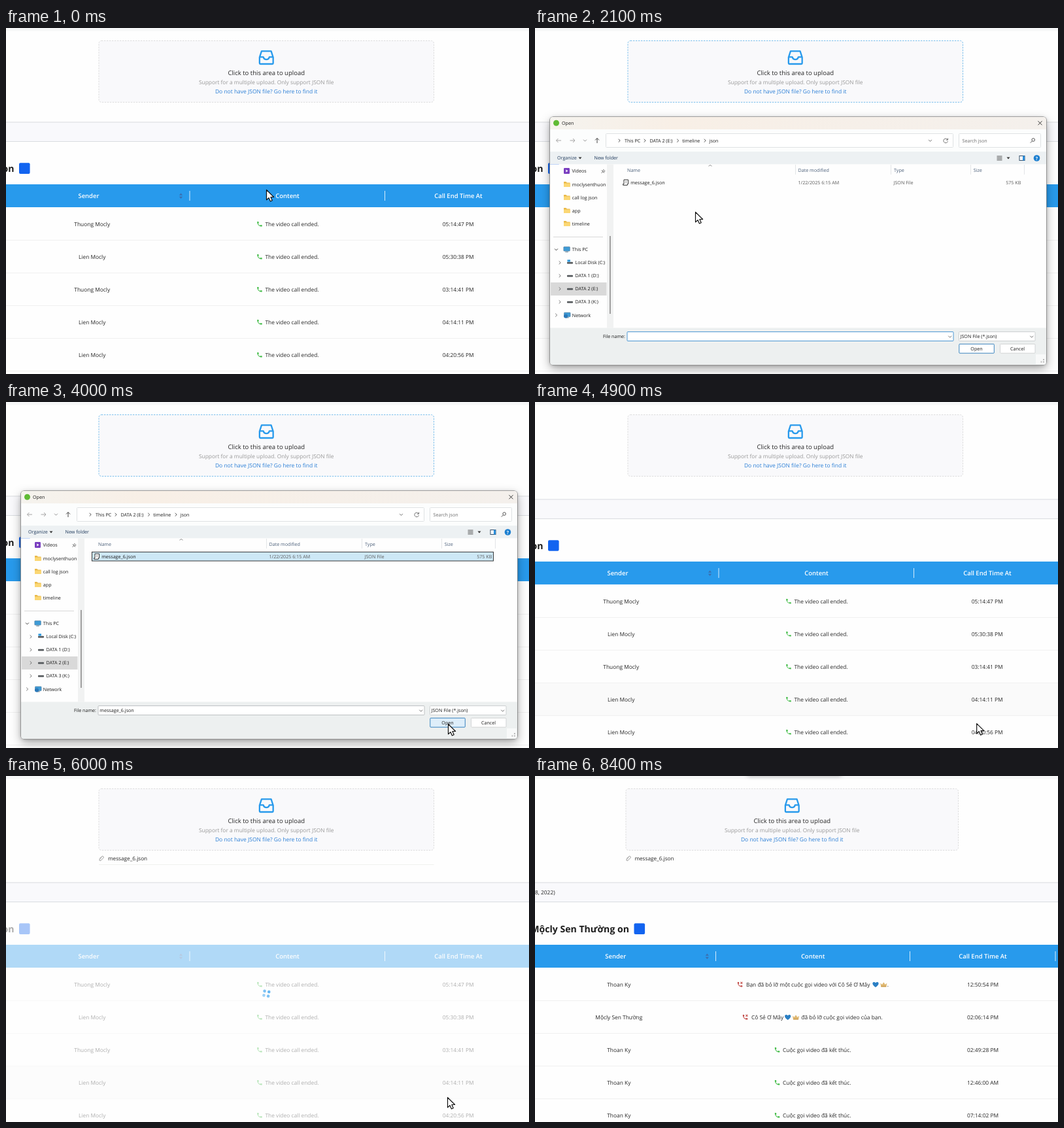
Recreate the animation shown at these times as an HTML page. Size 800x529 px, loop 8500 ms.

```html
<!DOCTYPE html>
<html lang="en">
<head>
<meta charset="utf-8">
<title>Call log upload</title>
<style>
  html, body { margin: 0; width: 100%; height: 100%; overflow: hidden; background: #fefefe; }
  svg { position: absolute; left: 0; top: 0; width: 800px; height: 529px; }
  text { font-family: "Open Sans", "Noto Sans", sans-serif; text-rendering: geometricPrecision; white-space: pre; }
  #shell {
    position: absolute; left: 23px; top: 136px; width: 759px; height: 379px; border-radius: 5px;
    box-shadow: 0 0 0 .8px #8a8a8a, 0 6px 16px rgba(0, 0, 0, .34), 0 1px 5px rgba(0, 0, 0, .2);
  }
  #toast { filter: blur(3px); }
</style>
</head>
<body>
<svg id="page" viewBox="0 0 800 529"></svg>
<div id="shell"></div>
<svg id="front" viewBox="0 0 800 529"></svg>
<script>
const LOOP = 8500, STEP = 100, SHIFT = 19;
const BLUE = '#289aec', INK = '#262626';
const $ = id => document.getElementById(id);

const text = (x, y, str, { size = 8.4, fill = INK, anchor = 'start', weight = 400 } = {}) =>
  `<text x="${x}" y="${y}" font-size="${size}" fill="${fill}" text-anchor="${anchor}" font-weight="${weight}">${str}</text>`;
const rect = (x, y, w, h, fill, extra = '') =>
  `<rect x="${x}" y="${y}" width="${w}" height="${h}" fill="${fill}" ${extra}/>`;
const path = (d, fill, extra = '') => `<path d="${d}" fill="${fill}" ${extra}/>`;
const line = (d, color, width = 1, extra = '') =>
  path(d, 'none', `stroke="${color}" stroke-width="${width}" ${extra}`);
const group = (x, y, body, scale = 1) => `<g transform="translate(${x} ${y}) scale(${scale})">${body}</g>`;

// ---- page ----
const HANDSET = 'M6.6 10.8c1.4 2.8 3.8 5.1 6.6 6.6l2.2-2.2c.3-.3.7-.4 1-.2 1.1.4 2.3.6 3.6.6.5 0 1 .4 1 1V20c0 .6-.5 1-1 1C10.600 21 3 13.400 3 4c0-.6.5-1 1-1h3.500c.6 0 1 .4 1 1 0 1.200.2 2.400.6 3.600.1.300 0 .7-.3 1z';
const phone = (x, y, missed) => group(x - 5, y - 5,
  path(HANDSET, missed ? '#c4504c' : '#45bd4a') +
  (missed ? line('M14 3l7 7M21 3l-7 7', '#c4504c', 2.4) : ''), .42);
const heart = (x, y) => group(x, y,
  path('M0 4.300C-8-.5-4-6 0-2.500 4-6 8-.5 0 4.300z', '#2a7fc4'));
const crown = (x, y) => group(x, y,
  path('M-4 3.500L-5-2-2.300 0 0-3.500 2.300 0 5-2 4 3.500z', '#dfb872') + rect(-4, 2.300, 8, 1.400, '#c99a4c'));

const inbox = cx => group(cx, 45, line(
  'M-7.300-9.700H7.300L10.400-.2V8.800Q10.400 10 9.200 10H-9.200Q-10.400 10-10.400 8.800V-.2ZM-10.400-.6H-4.600Q-3.600 3.200 0 3.200T4.600-.6H10.400',
  BLUE, 2.3, 'stroke-linejoin="round"'));

function uploadArea(left, width, id) {
  const cx = left + width / 2, mid = { anchor: 'middle' };
  return `<rect id="${id}" x="${left}" y="19.5" width="${width}" height="94" rx="4" fill="#f9f9fb" stroke="#dadada" stroke-width=".9" stroke-dasharray="2.4 1.6"/>` +
    inbox(cx) +
    text(cx, 72, 'Click to this area to upload', { ...mid, size: 9.53 }) +
    text(cx, 85.7, 'Support for a multiple upload. Only support JSON file', { ...mid, fill: '#999' }) +
    text(cx, 99.7, 'Do not have JSON file? Go here to find it', { ...mid, size: 8.47, fill: '#2b7fd6' });
}

const paperclip = x => line(`M${x} 126.500l3.300-3.300q1.500-1.300 2.600 0 1 1.200-.3 2.500l-3.400 3.300q-1.200 1-2 .1-.8-1 .2-1.900l3-2.900`, '#8c8c8c', .9);

const band = label => rect(-2, 144, 804, 29.5, '#f9f9fc', 'stroke="#d9dce0"') + text(0, 161.700, label);

function table({ cols, seps, sort, cell, rows, title, titleEnd }) {
  const head = { size: 9.45, fill: '#fff', weight: 600, anchor: 'middle' };
  const mid = { anchor: 'middle' };
  let out = text(titleEnd, 220, title, { size: 14.1, weight: 700, anchor: 'end', fill: '#1c1c1c' }) +
    rect(titleEnd + 7.5, 206.3, 16.6, 16.6, '#1264f0', 'rx="2"') +
    rect(0, 239, 800, 35, BLUE);
  ['Sender', 'Content', 'Call End Time At'].forEach((name, i) => out += text(cols[i], 260.2, name, head));
  out += path(`M${sort - 2.600} 255.800h5.200l-2.600-3.200zM${sort - 2.600} 257.800h5.200l-2.600 3.200z`, '#3a6fb0');
  seps.forEach(x => out += rect(x, 249, 1, 15, '#d6ecfc'));
  rows.forEach(([sender, content, time], i) => {
    const y = 299.7 + 50 * i;
    out += rect(0, 324 + 50 * i, 800, 1, '#f0f0f0') +
      text(cell[0], y + 3, sender, mid) + content(y) + text(cell[1], y + 3, time, mid);
  });
  return out;
}

const ended = (x, label) => y => phone(x - 8.500, y, false) + text(x, y + 3, label);
const endedEn = ended(396.4, 'The video call ended.');
const endedVi = ended(379, 'Cuộc gọi video đã kết thúc.');
const NICK = 'Cô Sẻ Ơ Mây', OWNER = 'Mộcly Sen Thường', FRIEND = 'Thoan Ky';
const missedByMe = y => phone(313.5, y, true) + text(323, y + 3, `Bạn đã bỏ lỡ một cuộc gọi video với ${NICK}`) +
  heart(521, y) + crown(533.3, y) + text(538.7, y + 3, '.');
const missedByFriend = y => phone(321.5, y, true) + text(331, y + 3, NICK) +
  heart(386.7, y) + crown(399, y) + text(407.3, y + 3, 'đã bỏ lỡ cuộc gọi video của bạn.');

const first = table({
  cols: [126.5, 430.5, 692], seps: [280.5, 579], sort: 267.5, cell: [131.7, 691.7], title: 'on', titleEnd: 12.5,
  rows: [
    ['Thuong Mocly', endedEn, '05:14:47 PM'],
    ['Lien Mocly', endedEn, '05:30:38 PM'],
    ['Thuong Mocly', endedEn, '03:14:41 PM'],
    ['Lien Mocly', endedEn, '04:14:11 PM'],
    ['Lien Mocly', endedEn, '04:20:56 PM']
  ]
});
const second = table({
  cols: [123.3, 425.2, 685], seps: [276, 573, 795.5], sort: 263.3, cell: [128.3, 685], title: `${OWNER} on`, titleEnd: 144,
  rows: [
    [FRIEND, missedByMe, '12:50:54 PM'],
    [OWNER, missedByFriend, '02:06:14 PM'],
    [FRIEND, endedVi, '02:49:28 PM'],
    [FRIEND, endedVi, '12:46:00 AM'],
    [FRIEND, endedVi, '07:14:02 PM']
  ]
});

$('page').innerHTML = rect(0, 0, 800, 529, '#fefefe') + rect(0, 0, 800, 4.5, '#f6f7f8') + `
  <g id="before">
    ${uploadArea(142, 512.5, 'drop')}
    <g id="item">${text(156, 128.8, 'message_6.json', { size: 8.2 })}
      <g id="busy">${line('M3.100 0A3.100 3.100 0 0 1-1.500 2.700', '#8c8c8c', .9)}</g>
      <g id="clip">${paperclip(143)}</g>
      <g id="bar">${rect(142, 135, 512.5, 1, '#f0f1ee')}</g>
    </g>
    <g id="lower">${band('')}
      <g id="log">${rect(0, 425, 800, 49, '#fafafa', 'id="hover"')}${first}</g>
    </g>
    <g id="spin"></g>
  </g>
  <g id="after">
    ${uploadArea(139, 508.5, 'drop2')}${paperclip(140)}
    ${text(152.4, 128.8, 'message_6.json', { size: 8.2 })}
    ${group(0, SHIFT, band('8, 2022)') + second)}
  </g>
  <g id="toast">${rect(324, -14, 145, 15, '#000', 'opacity=".22" rx="4"')}</g>`;

// ---- file dialog ----
const S = 7.15;
const label = (x, y, str, fill = '#1c1c1c', anchor = 'start') => text(x, y, str, { size: S, fill, anchor });
const chevron = (x, y, turn = 0, color = '#666') =>
  `<g transform="translate(${x} ${y}) rotate(${turn})">${line('M-1.300-2.400L1.200 0-1.300 2.400', color, .9)}</g>`;
const folder = (x, y) => path(`M${x} ${y - 4}h3.600l1.200 1.400h4.800v6.400h-9.600z`, '#e9b949') +
  rect(x, y - 1.5, 9.6, 5.5, '#fbd774', 'rx=".6"');
const monitor = (x, y) => rect(x, y - 4, 9.6, 6.600, '#3e9bd6', 'rx=".8" stroke="#5b7f99" stroke-width=".6"') +
  rect(x + 2.5, y + 3.200, 4.600, 1.200, '#6d8799');
const drive = (x, y) => rect(x, y - 1, 9, 2.800, '#55595c', 'rx=".8"');
const field = (x, y, w, h, stroke, id = '') =>
  rect(x, y, w, h, '#fff', `stroke="${stroke}" stroke-width=".9" rx="1" ${id && `id="${id}"`}`);

function navBar() {
  let out = rect(23, 155, 759, 34, '#fcfdfd') +
    line('M40 172h-7.500m3-3l-3 3 3 3M53.500 172h7.500m-3-3l3 3-3 3', '#9a9a9a', .9) + chevron(76.5, 172, 90, '#888') +
    line('M95 176v-7.500m-3 3l3-3 3 3', '#444', 1) +
    field(108.5, 161.5, 531, 21, '#dcdfe1') + field(648.5, 161.5, 125, 21, '#dcdfe1');
  [['This PC', 129, 137], ['DATA 2 (E:)', 168, 175.5], ['timeline', 218.5, 225.3], ['json', 260, 266.600]]
    .forEach(([name, arrow, x]) => out += chevron(arrow, 172.2, 0, '#444') + label(x, 174.5, name));
  return out + chevron(604.5, 172.2, 90) + line('M631.200 171a3.300 3.300 0 1 0 .2 2.200M631.500 168.500v2.700h-2.600', '#666', .9) +
    label(653.5, 174.5, 'Search json', '#6b6b6b') +
    line('M764.500 171a2.300 2.300 0 1 1-4.600 0 2.300 2.300 0 0 1 4.600 0M760.500 172.800l-2.700 2.800', '#555', 1);
}

function toolBar() {
  const navy = '#1e395b';
  return rect(23, 189, 759, 19.5, '#edf1f3') +
    label(34, 201.3, 'Organize', navy) + path('M66.500 197.500h5l-2.500 3z', '#333') + label(90.5, 201.3, 'New folder', navy) +
    line('M706.500 196h8m-8 2h8m-8 2h8m-8 2h8', '#555', .9) + path('M721.500 197.500h5l-2.500 3z', '#333') +
    rect(741, 195.500, 8, 7, '#fff', 'stroke="#35506b"') + rect(746, 195.5, 3, 7, '#2d8fdc') +
    '<circle cx="767.500" cy="199" r="4.800" fill="#1c7fd0"/>' +
    text(767.5, 201.6, '?', { size: 7, fill: '#fff', weight: 700, anchor: 'middle' });
}

function sideBar() {
  let out = rect(23, 208.5, 759, 250, '#fefefe') + rect(110, 208.5, 10, 250, '#f1f2f2') +
    rect(114.2, 318, 1.500, 119, '#858585') + rect(24, 389, 85.500, 20, '#d9d9d9') +
    rect(44, 214, 9, 9, '#7a3fc0', 'rx="1.200"') + path('M47.300 216.500v4l3.300-2z', '#fff') + label(56.5, 221.2, 'Videos') +
    line('M101.500 222l2.300-2.300m-2-2.200l4 4m-1-5l2.300 2.300-2.200 1.500-1.600-1.600z', '#777', 1);
  ['moclysenthuon', 'call log json', 'app', 'timeline'].forEach((name, i) => {
    const y = 239 + 20 * i;
    out += folder(44, y) + label(56.800, y + 2.5, name);
  });
  out += rect(109.8, 230, 10.200, 18, '#f1f2f2') + rect(28, 319, 76, 1, '#d8d8d8') +
    chevron(32.5, 338.8, 90, '#333') + monitor(43.800, 338.5) + label(56.800, 341.2, 'This PC');
  ['Local Disk (C:)', 'DATA 1 (D:)', 'DATA 2 (E:)', 'DATA 3 (K:)'].forEach((name, i) => {
    const y = 358.8 + 20 * i;
    out += chevron(38, y) + drive(49, y) + label(61.5, y + 2.5, name);
  });
  return out + rect(49.5, 354.3, 4.500, 3.200, '#2f9be0') + chevron(32.5, 439) +
    monitor(44.500, 439) + '<circle cx="47" cy="440.500" r="3" fill="#2a78b8"/>' + label(56.800, 441.5, 'Network');
}

function fileList() {
  let out = line('M265.500 211.300l2.500-1.800 2.500 1.800', '#777', .8);
  [['Name', 141], ['Date modified', 402.5], ['Type', 549], ['Size', 670.7]]
    .forEach(([name, x]) => out += label(x, 219.500, name, '#4c607a'));
  [398, 544, 666, 748].forEach(x => out += rect(x, 209, 1, 15, '#e3e5e7'));
  return out + rect(131.5, 229.300, 614, 13.700, '#cde8f6', 'id="picked" stroke="#222" stroke-width=".9"') +
    path('M136 232h6.500v6.500h-1.200v1.800h-6.600v-1.800h1.300z', '#fff', 'stroke="#333" stroke-width="1"') +
    line('M138 234.500h2.500m-2.500 2h2.500', '#777', .7) +
    label(146.2, 238.7, 'message_6.json') + label(402.5, 238.7, '1/22/2025 6:15 AM', '#5c5c5c') +
    label(548.5, 238.7, 'JSON File', '#5c5c5c') + label(743.300, 238.7, '575 KB', '#5c5c5c', 'end');
}

const footer = () => path('M23 458.500H782V510.500Q782 515 777.500 515H27.500Q23 515 23 510.500Z', '#edf0f0') +
  label(138, 474, 'File name:', '#1c1c1c', 'end') + field(141, 464.5, 499, 14, '#3b8ed0', 'input') +
  `<g id="chosen">${label(143.3, 474.2, 'message_6.json')}</g>` + chevron(634.7, 472, 90) +
  field(648.5, 464.5, 116.5, 14, '#c9cccd') + label(650.5, 474, 'JSON File (*.json)') + chevron(759.7, 472, 90) +
  field(648.8, 483.2, 53.5, 14, '#2678b8', 'ok') + label(675.5, 493, 'Open', '#1c1c1c', 'middle') +
  field(711.5, 483.2, 53.5, 14, '#cfd1d2') + label(738, 493, 'Cancel', '#1c1c1c', 'middle') +
  rect(766, 499, 15, 15, '#f8f9f9') + path('M779 506v2h-2v-2zM779 509.500v2h-2v-2zM775.500 509.500v2h-2v-2z', '#bbb');

$('front').innerHTML = `
  <defs><linearGradient id="cream"><stop stop-color="#f5f3ee"/><stop offset=".25" stop-color="#f8efe6"/><stop offset="1" stop-color="#f4f0ec"/></linearGradient></defs>
  <g id="title">
    ${path('M23 155V141Q23 136 28 136H777Q782 136 782 141V155Z', 'url(#cream)')}
    <circle cx="32.500" cy="145.300" r="4.500" fill="#5fbb35"/>
    ${label(41, 148.3, 'Open')}${line('M769.500 142.300l6 6m0-6l-6 6', '#333', 1)}
  </g>
  <g id="dialog">${navBar()}${toolBar()}${sideBar()}${fileList()}${footer()}</g>
  <g id="cursor">${path('M.5.5V15.800L4 12.600 6.400 18 9.200 16.800 6.900 11.500H11.600Z', '#fff', 'stroke="#111" stroke-width="1.200" stroke-linejoin="round"')}</g>`;

// ---- motion ----
const POINTER = [
  [0, 398, 247], [100, 398, 247], [800, 375, 67], [1400, 375, 67], [2000, 245, 281], [2300, 245, 281],
  [2700, 190, 233], [2900, 190, 233], [3600, 676, 492], [4600, 676, 492], [5000, 675, 491]
];
const ramp = (t, from, to) => Math.min(1, Math.max(0, (t - from) / (to - from)));
const smooth = k => k * k * (3 - 2 * k);
const show = (id, on) => $(id).style.display = on ? '' : 'none';
const attr = (id, name, value) => $(id).setAttribute(name, value);

function pointerAt(t) {
  const i = POINTER.findIndex(p => p[0] > t);
  if (i < 0) return POINTER[POINTER.length - 1].slice(1);
  const [a, b] = [POINTER[i - 1], POINTER[i]];
  const k = smooth(ramp(t, a[0], b[0]));
  return [a[1] + (b[1] - a[1]) * k, a[2] + (b[2] - a[2]) * k];
}

function spinner(t) {
  const turn = 10 + (t - 6000) * .3;
  let dots = '';
  [[-1, -1], [1, -1], [1, 1], [-1, 1]].forEach(([x, y], i) => {
    const glow = .65 + .35 * Math.cos(Math.PI * ((t - 6000) / 1000 + (i - 1) * .4));
    dots += `<circle cx="${x * 3.4}" cy="${y * 3.3}" r="2.300" fill="${BLUE}" opacity="${.3 + .4 * glow}"/>`;
  });
  return `<g transform="translate(398.300 332.700) rotate(${turn})">${dots}</g>`;
}

function draw(t) {
  const open = t >= 1200 && t < 4700, swapped = t >= 6400;
  show('before', !swapped);
  show('after', swapped);
  show('toast', t >= 6300);
  show('shell', open);
  show('title', open);
  show('dialog', open && t >= 1500);
  show('picked', t >= 2800);
  show('chosen', t >= 2800);
  attr('input', 'stroke', t >= 2800 ? '#b9bdbf' : '#3b8ed0');
  attr('ok', 'fill', t >= 3500 ? '#deeefa' : '#fff');
  attr('drop', 'stroke', t >= 600 && t < 4700 ? '#6db9ea' : '#dadada');

  show('item', t >= 5000);
  show('busy', t < 5500);
  show('clip', t >= 5500);
  show('bar', t >= 5700 && t < 6200);
  attr('busy', 'transform', `translate(147 126.500) rotate(${(t - 5300) * .36})`);
  attr('lower', 'transform', `translate(0 ${SHIFT * smooth(ramp(t, 4800, 5100))})`);
  show('hover', t >= 4900);
  attr('log', 'opacity', 1 - .64 * ramp(t, 5500, 5900));
  show('spin', t >= 5700);
  $('spin').innerHTML = spinner(t);

  const [x, y] = pointerAt(t);
  attr('cursor', 'transform', `translate(${x} ${y})`);
  show('cursor', !swapped);
}

const start = performance.now();
function tick() {
  const t = (performance.now() - start) % LOOP;
  draw(Math.floor(t / STEP) * STEP);
  requestAnimationFrame(tick);
}
tick();
</script>
</body>
</html>
```
